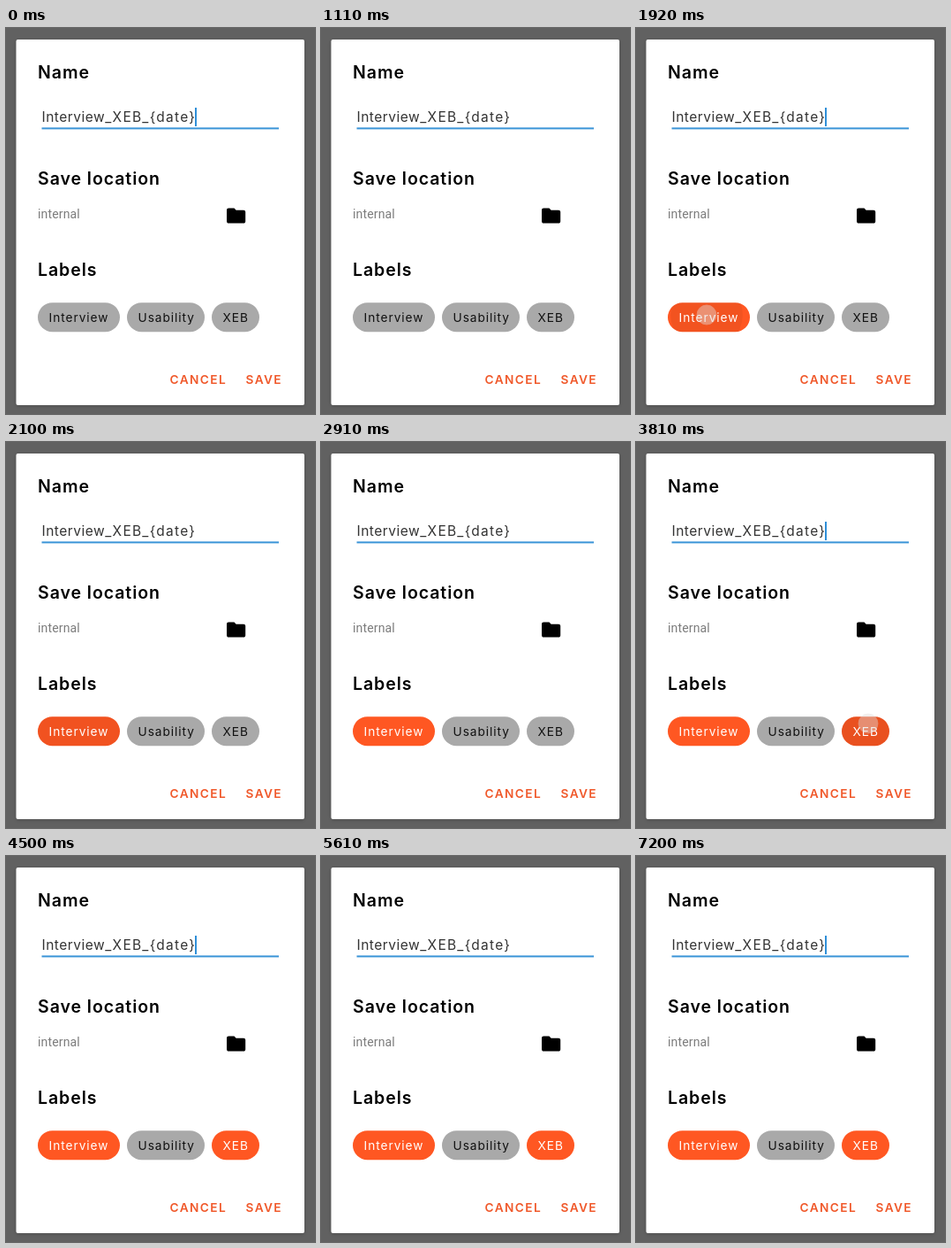
Recreate the animation shown at these times as an HTML page. Size 350 by 436 pixels, loop 7440 ms.

```html
<!DOCTYPE html>
<html lang="en">
<head>
<meta charset="utf-8">
<title>Save dialog</title>
<style>
html, body { margin: 0; width: 100%; height: 100%; overflow: hidden; background: #616161; }
svg { display: block; width: 350px; height: 436px; }
text { font-family: Inter, sans-serif; }
.head { font-size: 19.5px; font-weight: 600; letter-spacing: .95px; }
.field { font-size: 15.5px; letter-spacing: .5px; fill: #333; }
.wide { letter-spacing: 1.25px; }
.path { font: 14px Roboto, sans-serif; letter-spacing: .15px; fill: #7c7c7c; }
.chip { font-size: 13.7px; letter-spacing: .95px; }
.action { font-size: 13.7px; font-weight: 600; letter-spacing: 1.4px; fill: #f0592b; }
</style>
</head>
<body>
<svg viewBox="0 0 350 436">
  <defs>
    <filter id="shade" x="-5%" y="-5%" width="110%" height="110%">
      <feDropShadow dx="0" dy="1" stdDeviation="2" flood-opacity=".2"/>
    </filter>
  </defs>
  <rect width="350" height="436" fill="#616161"/>
  <rect x="11.5" y="13" width="326.5" height="413" rx="2" fill="#fff" filter="url(#shade)"/>
  <text class="head" x="36" y="57.3">Name</text>
  <text class="field" x="40.5" y="106">Interview<tspan class="wide">_XEB_{date}</tspan></text>
  <rect x="40.5" y="112.4" width="268.5" height="2" fill="#3a94d8"/>
  <rect id="caret" x="214" y="90" width="2" height="21" fill="#2f8fd8"/>
  <text class="head" x="36" y="177.3">Save location</text>
  <text class="path" x="36" y="215">internal</text>
  <path transform="translate(247.9 199.3) scale(1.06)" d="M10 4H4C2.9 4 2 4.9 2 6V18C2 19.1 2.9 20 4 20H20C21.1 20 22 19.1 22 18V8C22 6.9 21.1 6 20 6H12Z"/>
  <text class="head" x="36" y="279.5">Labels</text>
  <g id="chips"></g>
  <text class="action" x="185.5" y="402">CANCEL</text>
  <text class="action" x="271.5" y="402">SAVE</text>
  <circle id="touch" r="11" fill="#e4dcd8" stroke="#ddd" stroke-width=".8"/>
</svg>
<script>
const LOOP = 7440;
const get = id => document.getElementById(id);
const clamp = v => Math.max(0, Math.min(1, v));
const caretOff = [210, 1110, 2010, 2910, 3840, 4740, 5610, 6510];
const caretOn = [660, 1560, 2460, 3360, 4290, 5160, 6090, 6960];

// Each tap: press time, moment of selection, end of ripple, touch point
const chips = [
  { label: 'Interview', x: 36, w: 93, tap: { start: 1800, pick: 1890, end: 2220, x: 80, y: 324 } },
  { label: 'Usability', x: 137, w: 88 },
  { label: 'XEB', x: 233, w: 54, tap: { start: 3600, pick: 3750, end: 4080, x: 263, y: 318 } }
];

get('chips').innerHTML = chips.map((c, i) => {
  const pill = `x="${c.x}" y="310.2" width="${c.w}" height="33" rx="16.5"`;
  return `<clipPath id="clip${i}"><rect ${pill}/></clipPath>
    <rect id="pill${i}" ${pill} fill="#a9a9a9"/>
    <circle id="ripple${i}" clip-path="url(#clip${i})" cx="${c.tap?.x ?? 0}" cy="${c.tap?.y ?? 0}"/>
    <text id="label${i}" class="chip" x="${c.x + 12.5}" y="331.5">${c.label}</text>`;
}).join('');

function draw(t) {
  get('caret').style.opacity = caretOff.some((off, i) => t >= off && t < caretOn[i]) ? 0 : 1;
  let touchAlpha = 0;
  chips.forEach(({ w, tap }, i) => {
    const picked = tap && t >= tap.pick;
    get('pill' + i).setAttribute('fill', picked ? '#ff5722' : '#a9a9a9');
    get('label' + i).setAttribute('fill', picked ? '#fff' : '#111');
    const active = tap && t >= tap.start && t < tap.end;
    const age = active ? t - tap.start : 0;
    const ripple = get('ripple' + i);
    ripple.setAttribute('r', active ? 8 + w * .7 * clamp(age / 240) : 0);
    ripple.style.opacity = active ? .1 * clamp(age / 240) * clamp((tap.end - t) / 210) : 0;
    if (active) {
      get('touch').setAttribute('cx', tap.x);
      get('touch').setAttribute('cy', tap.y);
      touchAlpha = .45 * clamp((age + 30) / 60) * clamp((tap.pick + 180 - t) / 120);
    }
  });
  get('touch').style.opacity = touchAlpha;
}

const begin = performance.now();
function tick() {
  draw((performance.now() - begin) % LOOP);
  requestAnimationFrame(tick);
}
tick();
</script>
</body>
</html>
```
